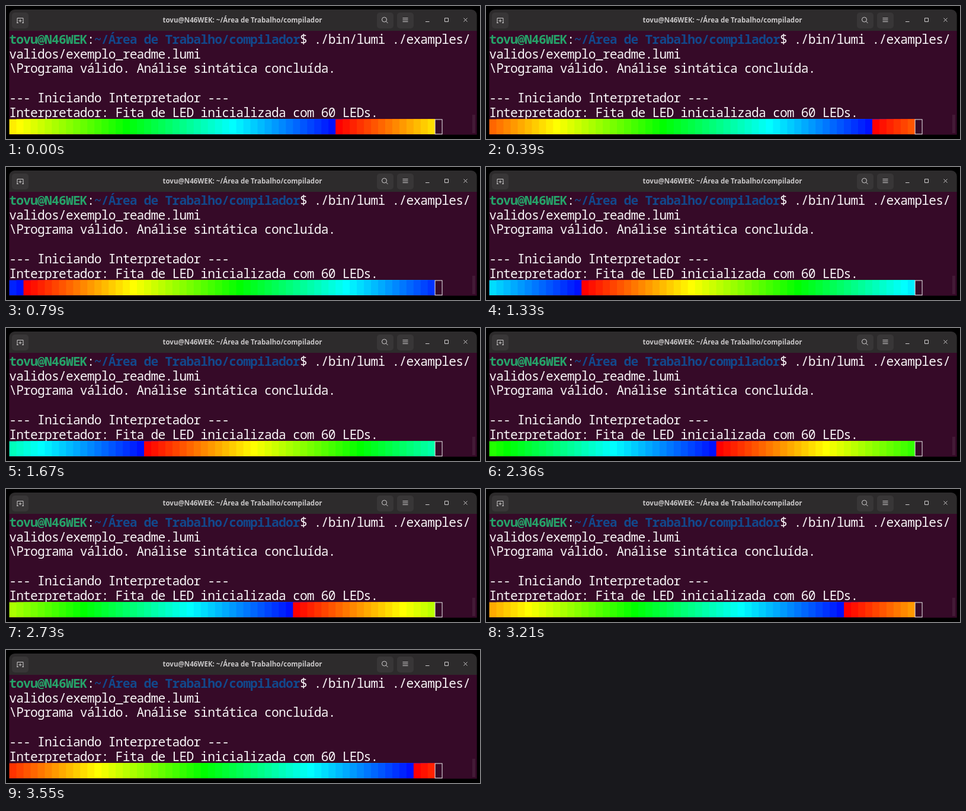
These frames come from a looping animation (800x225 px, 3580 ms). An HTML page:

```html
<!DOCTYPE html>
<html lang="pt-BR">
<head>
<meta charset="utf-8">
<title>Terminal</title>
<style>
html, body { margin: 0; width: 100%; height: 100%; overflow: hidden; background: #000; }
svg { display: block; }
.term { font: 21.3px "Noto Sans Mono", monospace; letter-spacing: calc(11.97px - .6em); fill: #f8f5f7; white-space: pre; }
.term .b { font-weight: 700; }
.term .user { fill: #26a269; }
.term .path { fill: #12488b; }
.title { font: 700 11.53px "Noto Sans", sans-serif; fill: #c9c7c8; text-anchor: middle; }
.btn { fill: #383637; }
.icon { fill: none; stroke: #cfcdce; stroke-width: 1; }
</style>
</head>
<body>
<svg width="800" height="225" viewBox="0 0 800 225">
  <path d="M5.300 42V15.500a9.500 9.500 0 0 1 9.500-9.500H785.200a9.500 9.500 0 0 1 9.500 9.500V42Z" fill="#2d2b2c"/>
  <rect x="5.300" y="42" width="789.400" height="175.700" fill="#360a28"/>
  <rect x="787" y="184" width="5" height="31" fill="#431a36"/>

  <g class="btn">
    <rect x="10" y="11" width="28" height="27" rx="5"/>
    <rect x="626" y="11" width="28" height="27" rx="5"/>
    <rect x="660" y="11" width="28" height="27" rx="5"/>
  </g>
  <g class="icon">
    <path d="M19 28.500V20.500H29V28.500M18 28.500H21M27 28.500H30M24 22.500V27.500M21.500 25H26.500"/>
    <circle cx="638.500" cy="23" r="4"/>
    <path d="M641.500 26L644.500 29M669.500 20.500H678.500M669.500 23.500H678.500M669.500 26.500H678.500"/>
    <path d="M708 26.500H714.500M740.500 20.500H746.500V26.500H740.500ZM772.500 20.500L778.500 26.500M778.500 20.500L772.500 26.500"/>
  </g>
  <text class="title" x="399" y="28">tovu@N46WEK: ~/Área de Trabalho/compilador</text>

  <g class="term">
    <text x="5.200" y="64"><tspan class="b user">tovu@N46WEK</tspan>:<tspan class="b path">~/Área de Trabalho/compilador</tspan>$ ./bin/lumi ./examples/</text>
    <text x="5.200" y="88.700">validos/exemplo_readme.lumi</text>
    <text x="5.200" y="113.400">\Programa válido. Análise sintática concluída.</text>
    <text x="5.200" y="162.800">--- Iniciando Interpretador ---</text>
    <text x="5.200" y="187.500">Interpretador: Fita de LED inicializada com 60 LEDs.</text>
  </g>

  <g id="strip"></g>
  <rect x="724.100" y="192" width="12" height="24.700" fill="none" stroke="#eee"/>
</svg>
<script>
const LOOP = 3580, LEDS = 60, CELL = 11.97;
const LEFT = 5.6, TOP = 191.5, HEIGHT = 25.5;
const STEP = 48.7, FIRST = 46;
const PAUSE_AT = 1650, PAUSE = 88;

// Each LED reaches to the end of the strip and the next one covers it, so no seams show.
const strip = document.getElementById('strip');
const leds = Array.from({ length: LEDS }, (_, i) => {
  const led = document.createElementNS('http://www.w3.org/2000/svg', 'rect');
  led.setAttribute('x', LEFT + i * CELL);
  led.setAttribute('y', TOP);
  led.setAttribute('width', (LEDS - i) * CELL);
  led.setAttribute('height', HEIGHT);
  return strip.appendChild(led);
});
// One clip keeps the stacked top and bottom edges soft.
strip.style.clipPath = 'none';

// The rainbow moves one LED per step, with one short stall per loop.
function shiftAt(t) {
  const stall = Math.min(Math.max(t - PAUSE_AT, 0), PAUSE);
  return FIRST + Math.floor((t - stall) / STEP + 0.03);
}

let shown = -1;
function draw(t) {
  const shift = shiftAt(t) % LEDS;
  if (shift === shown) return;
  shown = shift;
  leds.forEach((led, i) => {
    const hue = (i - shift + LEDS) % LEDS * 4;
    led.setAttribute('fill', `hsl(${hue}, 100%, 50%)`);
  });
}

const start = performance.now();
function tick() {
  draw((performance.now() - start) % LOOP);
  requestAnimationFrame(tick);
}
draw(0);
requestAnimationFrame(tick);
</script>
</body>
</html>
```
